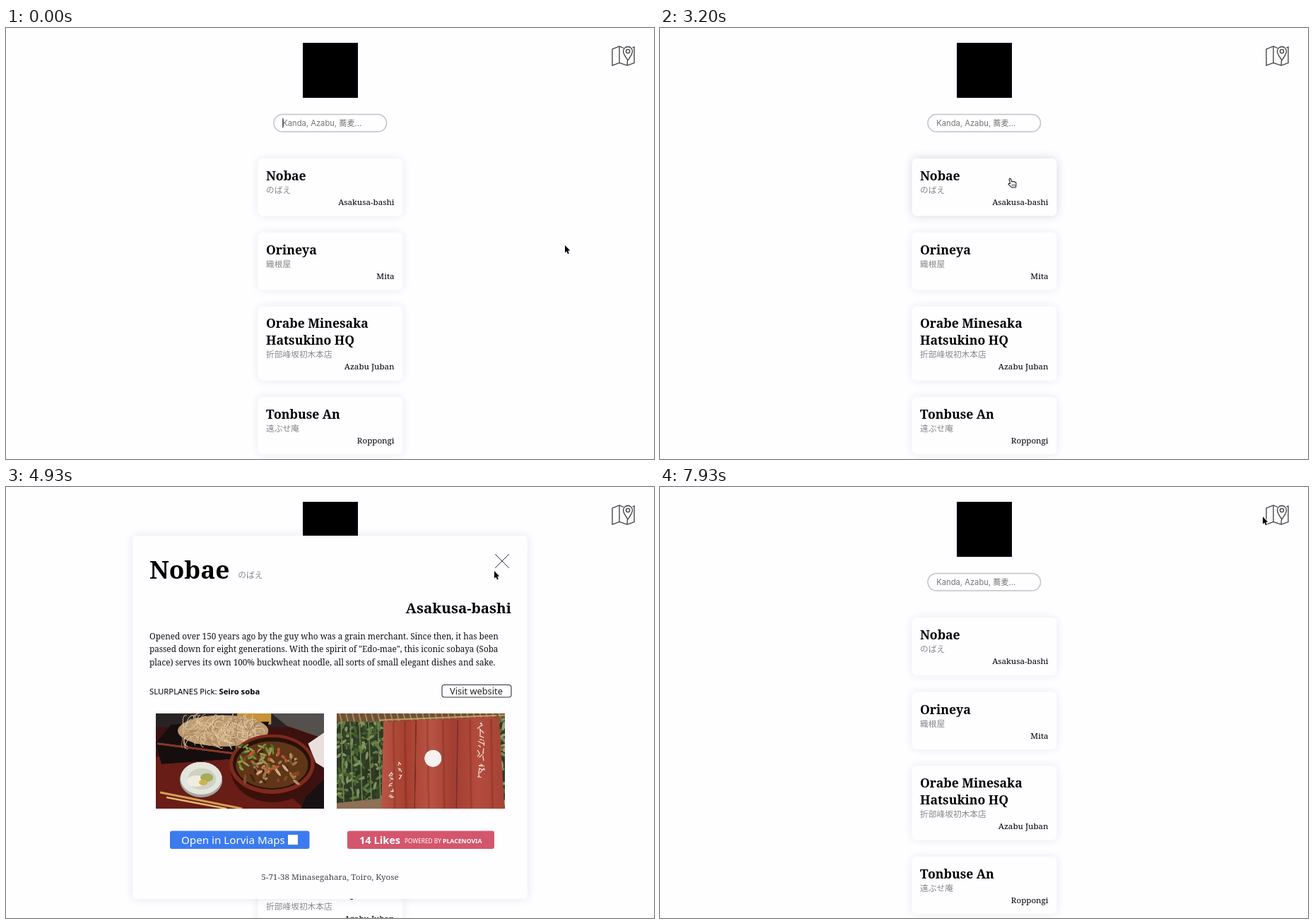
An HTML page with a canvas that plays this animation: 917x611 px, repeating every 8000 ms.

```html
<!DOCTYPE html>
<html lang="ja">
<head>
<meta charset="utf-8">
<title>Soba guide</title>
<style>
html, body { margin: 0; width: 100%; height: 100%; overflow: hidden; background: #fefdff; }
canvas { display: block; width: 917px; height: 611px; }
</style>
</head>
<body>
<canvas id="stage"></canvas>
<script>
const W = 917, H = 611, LOOP = 8000, BG = '#fefdff';
const SERIF = '"Noto Serif", serif';
const SANS = '"Noto Sans", sans-serif';
const CJK = '"Noto Sans CJK JP", "Noto Sans CJK", sans-serif';
const UI = 'Inter, "Noto Sans CJK JP", "Noto Sans CJK", sans-serif';

const stage = document.getElementById('stage');
const dpr = window.devicePixelRatio || 1;
stage.width = W * dpr;
stage.height = H * dpr;
let ctx = stage.getContext('2d');

const clamp = v => Math.max(0, Math.min(1, v));
const ramp = (t, a, b) => clamp((t - a) / (b - a));
const smooth = u => u * u * (3 - 2 * u);
const easeOut = u => 1 - (1 - u) ** 3;

function random(seed) {
  return () => (seed = (seed * 16807) % 2147483647) / 2147483647;
}

// Drawing helpers
function text(str, x, y, font, color = '#000', align = 'left') {
  ctx.font = font;
  ctx.fillStyle = color;
  ctx.textAlign = align;
  ctx.fillText(str, x, y);
  return ctx.measureText(str).width;
}
function box(x, y, w, h, color, r = 0) {
  ctx.fillStyle = color;
  ctx.beginPath();
  ctx.roundRect(x, y, w, h, r);
  ctx.fill();
}
function oval(x, y, rx, ry, color, turn = 0) {
  ctx.fillStyle = color;
  ctx.beginPath();
  ctx.ellipse(x, y, rx, ry, turn, 0, 7);
  ctx.fill();
}
function trace(points) {
  ctx.beginPath();
  for (let i = 0; i < points.length; i += 2) ctx.lineTo(points[i], points[i + 1]);
}
function poly(color, ...points) {
  trace(points);
  ctx.fillStyle = color;
  ctx.fill();
}
function line(color, width, ...points) {
  trace(points);
  ctx.strokeStyle = color;
  ctx.lineWidth = width;
  ctx.stroke();
}
function panel(x, y, w, h, shade, r) {
  ctx.save();
  ctx.shadowColor = `rgba(40,35,42,${shade})`;
  ctx.shadowBlur = 13 * dpr;
  box(x, y, w, h, BG, r);
  ctx.restore();
}
function cross(x, y, r) {
  line('#333', 1, x - r, y - r, x + r, y + r);
  line('#333', 1, x + r, y - r, x - r, y + r);
}

// Pictures, each painted once
function picture(w, h, paint) {
  const canvas = document.createElement('canvas');
  canvas.width = w * 2;
  canvas.height = h * 2;
  const outer = ctx;
  ctx = canvas.getContext('2d');
  ctx.scale(2, 2);
  paint(w, h);
  ctx = outer;
  return canvas;
}
function leaves(seed, count, x, y, w, h, colors, size = 3) {
  const rnd = random(seed);
  for (let i = 0; i < count; i++) {
    oval(x + rnd() * w, y + rnd() * h, size * (0.5 + rnd()), size * 0.4,
      colors[Math.floor(rnd() * colors.length)], rnd() * 3);
  }
}
function bush(seed, x, y, rx, ry, colors) {
  const rnd = random(seed);
  for (let i = 0; i < rx * ry; i++) {
    const a = rnd() * 6.3, r = Math.sqrt(rnd());
    oval(x + Math.cos(a) * r * rx, y + Math.sin(a) * r * ry, 1 + rnd() * 1.6, 0.9,
      colors[Math.floor(rnd() * colors.length)], rnd() * 3);
  }
}
function brush(seed, x, y, count, step, color, size) {
  const rnd = random(seed);
  const near = () => (rnd() - 0.5) * size;
  for (let i = 0; i < count; i++) {
    for (let j = 0; j < 3; j++) {
      const cy = y + i * step;
      line(color, 1.2, x + near(), cy + near(), x + near(), cy + near());
    }
  }
}

const shopFront = picture(182, 104, (w, h) => {
  const greens = ['#3d5230', '#5c7743', '#819b60', '#222d1c', '#a3b582', '#2c3b24'];
  box(0, 0, w, h, '#272424');
  box(0, 0, 18, h, '#e4e6e7');
  box(11, 0, 3, h, '#c3c6c8');
  box(0, 45, 9, 59, '#e6eeea');
  for (let y = 46; y < 104; y += 12) poly('#31906a', 0, y + 5, 9, y, 9, y + 6, 0, y + 11);
  box(18, 0, 20, h, '#2e2d30');
  for (let y = 8; y < 50; y += 8) box(20, y, 16, 1, '#454447');
  poly('#b5b9b6', 152, 0, 182, 0, 182, 24, 160, 26);
  leaves(8, 45, 150, 0, 32, 24, ['#d8dbd8', '#7b8178', '#535853'], 3);
  poly('#8a7361', 68, 4, 122, 2, 124, 18, 67, 19);
  line('#cfc0ad', 1, 67, 19, 124, 18);
  box(70, 6, 6, 7, '#b15645');
  for (let x = 86; x < 118; x += 11) brush(x, x, 11, 1, 1, '#f1e8dc', 11);
  poly('#787673', 46, 21, 137, 21, 154, 30, 36, 30);
  for (let x = 42; x < 152; x += 5) line('#3f3d3b', 1.3, 95 + (x - 95) * 0.8, 21, x, 30);
  line('#b9b6b1', 1.6, 36, 30.5, 154, 30.5);
  box(38, 34, 112, 61, '#1b1817');
  box(54, 41, 56, 20, '#5c392d');
  for (let x = 56; x < 112; x += 6) line('#36211b', 1.5, x, 41, x, 61);
  oval(96, 51, 2, 2, '#e1d3c2');
  box(84, 62, 22, 32, '#0d0a0a');
  box(90, 66, 3, 20, '#57452f');
  box(97, 70, 4, 15, '#35302d');
  poly('#827f7c', 18, 96, 182, 93, 182, 104, 10, 104);
  bush(21, 42, 69, 16, 29, greens);
  bush(5, 71, 70, 10, 25, greens);
  bush(77, 166, 40, 16, 20, greens);
  bush(52, 151, 70, 17, 25, greens);
  bush(61, 172, 78, 11, 22, greens);
  box(114, 66, 18, 29, '#b9b4ae');
  box(115, 67, 9, 14, '#d9d5cd');
  box(125, 68, 6, 18, '#6f7e88');
  brush(12, 119, 74, 3, 8, '#a33b2f', 9);
  poly('#f2f1ec', 139, 67, 153, 65, 156, 80, 142, 83);
  oval(147, 72, 3, 3, '#70645d');
  box(142, 83, 10, 14, '#1e1919');
});

const meal = picture(237, 135, (w, h) => {
  const rnd = random(31);
  box(0, 0, w, h, '#3d1110');
  box(0, 0, w, 20, '#2a2324');
  box(115, 0, 48, 16, '#c7923b');
  poly('#54504e', 163, 0, 237, 0, 237, 36, 185, 18);
  poly('#681d17', 0, 62, 110, 50, 210, 135, 0, 135);
  poly('#160e0e', 0, 42, 22, 16, 160, 12, 152, 35, 120, 64, 8, 72);
  line('#873629', 3, 2, 43, 118, 58, 155, 23);
  oval(95, 25, 64, 22, '#bd9a70');
  for (let i = 0; i < 200; i++) {
    const x = 95 + (rnd() - 0.5) * 106, y = 25 + (rnd() - 0.5) * 31;
    ctx.strokeStyle = ['#dcc19a', '#cbab80', '#a5825a', '#e6cba8'][i % 4];
    ctx.lineWidth = 0.9;
    ctx.beginPath();
    ctx.ellipse(x, y, 5 + rnd() * 9, 3 + rnd() * 4, rnd() * 3, 0, 2 + rnd() * 2);
    ctx.stroke();
  }
  poly('#eadfdd', 237, 28, 215, 43, 226, 70, 237, 77);
  oval(165, 80, 59, 46, '#3b100d');
  oval(164, 72, 60, 42, '#7d2a1c');
  oval(164, 71, 55, 37, '#281209');
  oval(164, 73, 51, 33, '#5f3618');
  leaves(18, 45, 125, 49, 75, 49, ['#a37448', '#7d4c26', '#b58c62', '#432612'], 5);
  leaves(44, 30, 118, 45, 48, 34, ['#6f8d36', '#47692c', '#8a9d4d'], 4);
  leaves(9, 12, 135, 50, 50, 40, ['#b85a31', '#cda981'], 5);
  oval(64, 94, 30, 25, '#a5a59f');
  oval(64, 92, 29, 23, '#e4e5dd');
  oval(65, 93, 20, 15, '#cfd1c3');
  oval(57, 96, 13, 8, '#efede0');
  oval(72, 91, 9, 6, '#a7ac58');
  oval(67, 98, 6, 4, '#ceb44e');
  line('#d69f52', 3, 6, 112, 122, 135);
  line('#e3b96f', 2.5, 15, 119, 100, 135);
  poly('#171113', 212, 118, 237, 94, 237, 135, 205, 135);
});

const curtain = picture(237, 135, (w, h) => {
  box(0, 0, w, h, '#2f3b27');
  leaves(62, 260, 0, 0, 68, 120, ['#45602f', '#5f7a41', '#28351f', '#7f9560', '#344627'], 5);
  for (let x = 6; x < 66; x += 13) line('#74824f', 1.5, x, 12, x + 4, 125);
  poly('#8e7055', 0, 127, 67, 120, 67, 135, 0, 135);
  box(0, 0, w, 12, '#6e5136');
  for (let x = 4; x < w; x += 9) line('#a88656', 2, x, 0, x + 3, 12);
  line('#c39a68', 2, 60, 10, 237, 3);
  leaves(54, 45, 216, 5, 21, 125, ['#7d8d51', '#566b38', '#a59a72'], 5);
  const cloth = ctx.createLinearGradient(65, 0, 232, 0);
  ['#b75545', '#a6402f', '#b95445', '#a23e31', '#b44c3e', '#a84436']
    .forEach((c, i) => cloth.addColorStop(i / 5, c));
  poly(cloth, 66, 12, 229, 5, 237, 135, 63, 135);
  for (const x of [112, 171]) line('#752e24', 1.5, x, 10, x - 2, 135);
  for (const x of [80, 96, 128, 150, 188, 218]) line('rgba(105,30,22,.25)', 3, x, 9, x + 2, 135);
  brush(14, 204, 18, 9, 9, '#eee2d6', 11);
  brush(3, 90, 72, 3, 9, '#eadcd1', 7);
  brush(22, 77, 86, 5, 8, '#eadcd1', 7);
  oval(136, 64, 12, 12, '#f6f2ef');
});

// Shop list
const CARD_X = 356.5, CARD_W = 205, GAP = 23.2, SCROLL_END = 506;
const SCROLL_START = 1118, SCROLL_TIME = 380;
const shops = [
  [['Nobae'], 'のばえ', 'Asakusa-bashi'],
  [['Orineya'], '織根屋', 'Mita'],
  [['Orabe Minesaka', 'Hatsukino HQ'], '折部峰坂初木本店', 'Azabu Juban'],
  [['Tonbuse An'], '遠ぶせ庵', 'Roppongi'],
  [['Kiritsune Soba'], 'きりつねのそば', 'Kanda Awajicho'],
  [['Momizeki'], '椛瀬木', 'Akasaka'],
  [['Sumiriya'], '澄り家', 'Ebisu'],
  [['Kurinobe'], '栗延', 'Jingumae'],
  [['Tsukimori Hanabe'], '槻守花辺', 'Akasaka']
].map(([title, kana, area]) => ({ title, kana, area }));

// A card starts to grow when the scroll first brings its top into view.
let nextTop = 185;
for (const shop of shops) {
  shop.top = nextTop;
  shop.height = 81.5 + 24 * (shop.title.length - 1);
  nextTop += shop.height + GAP;
  const reach = (shop.top - H) / SCROLL_END;
  shop.enter = reach > 0 ? SCROLL_START + SCROLL_TIME * (1 - Math.sqrt(1 - reach)) : -1e6;
}

function scrollAt(t) {
  const down = 1 - (1 - ramp(t, SCROLL_START, SCROLL_START + SCROLL_TIME)) ** 2;
  return SCROLL_END * (down - smooth(ramp(t, 2150, 2800)));
}

function drawDetails(y, hover) {
  const w = text('Slurplanes Pick: ', 368, y + 88, `11.3px ${SANS}`);
  text('Seiro soba', 368 + w, y + 88, `bold 11.3px ${SANS}`);
  ctx.save();
  ctx.beginPath();
  ctx.roundRect(368, y + 97.5, 182, 104, 3);
  ctx.clip();
  if (hover > 0) ctx.filter = `grayscale(${hover}) contrast(${1 + hover * 0.3})`;
  ctx.drawImage(shopFront, 368, y + 97.5, 182, 104);
  ctx.restore();
  ctx.save();
  ctx.globalAlpha *= hover;
  text('Learn More', 459, y + 155, `14px ${SERIF}`, '#fff', 'center');
  ctx.restore();
}

function drawCard(shop, y, t, extra, state) {
  const scale = easeOut(ramp(t, shop.enter, shop.enter + 1500));
  const h = shop.height + extra;
  if (scale <= 0 || y > H + 20 || y + h < 130) return;
  const cx = CARD_X + CARD_W / 2, cy = y + h / 2;
  const alpha = scale ** 1.5;
  ctx.save();
  ctx.translate(cx, cy);
  ctx.scale(scale, scale);
  ctx.translate(-cx, -cy);
  panel(CARD_X, y, CARD_W, h, alpha * (0.09 + 0.1 * state.lift), 7);
  ctx.globalAlpha = alpha;
  const open = extra > 2;
  const color = open ? `rgb(${178 * state.hover},${26 * state.hover},${32 * state.hover})` : '#000';
  let base = y + 31;
  shop.title.forEach((part, i) => {
    const w = text(part, 368, base + 24 * i, `bold 17.6px ${SERIF}`, color);
    if (open) box(368, base + 2, w, 1.4, color);
  });
  base += 24 * (shop.title.length - 1);
  text(shop.kana, 368, base + 18, `11.73px ${CJK}`, '#888');
  text(shop.area, 549.5, base + 35, `11.6px ${SERIF}`, '#000', 'right');
  if (open) {
    ctx.beginPath();
    ctx.rect(CARD_X, y, CARD_W, h - 8);
    ctx.clip();
    drawDetails(y, state.hover);
  }
  ctx.restore();
}

function drawList(t) {
  const scroll = scrollAt(t);
  const extra = 131.5 * (easeOut(ramp(t, 3400, 4000)) - easeOut(ramp(t, 7400, 8050)));
  const idle = { lift: 0, hover: 0 };
  const first = {
    lift: ramp(t, 2980, 3150) - 0.5 * ramp(t, 3550, 3750) - 0.5 * ramp(t, 7450, 7650),
    hover: ramp(t, 3800, 4050) - ramp(t, 4400, 4650)
  };
  shops.forEach((shop, i) => {
    const y = shop.top - scroll;
    if (i) drawCard(shop, y + extra, t, 0, idle);
    else drawCard(shop, y, t, extra, first);
  });
  if (t > 3420 && t < 7420) cross(582.5, 203, 9.3);
}

function drawMapIcon() {
  const ink = '#3c3c3c';
  line(ink, 1.3, 874, 28.5, 868, 26, 858, 30, 858, 53, 868, 49.5, 879, 53, 889, 49.5, 889, 27, 886.5, 28);
  line(ink, 1.3, 868, 26, 868, 49.5);
  line(ink, 1.3, 879.5, 46, 879, 53);
  ctx.beginPath();
  ctx.moveTo(880, 46);
  ctx.bezierCurveTo(877, 41, 873.5, 37, 873.5, 33);
  ctx.arc(880, 33, 6.5, Math.PI, 0);
  ctx.bezierCurveTo(886.5, 37, 883, 41, 880, 46);
  ctx.stroke();
  ctx.beginPath();
  ctx.arc(880, 33, 2.6, 0, 7);
  ctx.stroke();
}

function drawHeader(t) {
  box(0, 0, W, 162, BG);
  box(420, 21, 78, 78, '#000');
  drawMapIcon();
  ctx.strokeStyle = '#c3c1c4';
  ctx.lineWidth = 1.5;
  ctx.beginPath();
  ctx.roundRect(379, 122.5, 159.5, 24.5, 12.2);
  ctx.stroke();
  text('Kanda, Azabu, 蕎麦...', 391.3, 139, `11.2px ${UI}`, '#757575');
  if (t < 3400 && (t + 370) % 1000 < 500) box(391.3, 128, 1.1, 13.5, '#222');
}

// Shop dialog
const story = [
  'Opened over 150 years ago by the guy who was a grain merchant. Since then, it has been',
  'passed down for eight generations. With the spirit of "Edo-mae", this iconic sobaya (Soba',
  'place) serves its own 100% buckwheat noodle, all sorts of small elegant dishes and sake.'
];

function drawDialog(t) {
  const fade = 1 - ramp(t, 5380, 5730);
  const shown = ramp(t, 4290, 4400) * fade;
  if (shown <= 0) return;
  ctx.save();
  ctx.globalAlpha = shown;
  panel(179, 69, 559, 515, 0.11, 6);
  ctx.globalAlpha = ramp(t, 4310, 4680) * fade;

  const w = text('Nobae', 203, 130, `bold 35.2px ${SERIF}`);
  text('のばえ', 203 + w + 12, 129, `11.73px ${CJK}`, '#888');
  cross(702, 105, 9.8);
  text('Asakusa-bashi', 715, 179, `bold 20.5px ${SERIF}`, '#000', 'right');
  story.forEach((row, i) => text(row, 203, 216 + 18.3 * i, `11.73px ${SERIF}`, '#111'));

  const pick = text('SLURPLANES Pick: ', 203, 293.5, `11.3px ${SANS}`);
  text('Seiro soba', 203 + pick, 293.5, `bold 11.3px ${SANS}`);
  ctx.strokeStyle = '#333';
  ctx.lineWidth = 1.1;
  ctx.beginPath();
  ctx.roundRect(617, 280.5, 98, 17.5, 3.5);
  ctx.stroke();
  text('Visit website', 665.5, 294, `12.8px ${SANS}`, '#222', 'center');

  ctx.drawImage(meal, 212, 320.5, 237.5, 135.5);
  ctx.drawImage(curtain, 468, 320.5, 237.5, 135.5);

  box(232, 487.5, 197.5, 25.5, '#3b7bef', 3);
  text('Open in Lorvia Maps', 248, 505.5, `15.2px ${SANS}`, '#fff');
  box(399, 493, 14, 14, '#fff');
  box(483, 487.5, 208, 25.5, '#d4566c', 3);
  text('14 Likes', 500, 505.5, `bold 14.6px ${SANS}`, '#fff');
  text('POWERED BY', 564, 504.5, `300 8.3px ${SANS}`, '#fff');
  text('PLACENOVIA', 618, 504.5, `bold 8.7px ${SANS}`, '#fff');
  text('5-71-38 Minasegahara, Toiro, Kyose', 458.5, 557, `11.6px ${SERIF}`, '#444', 'center');
  ctx.restore();
}

// Mouse pointer: time, x, y
const path = [
  [0, 791, 308], [130, 791, 308], [930, 552, 384], [1300, 537, 386], [2700, 537, 386],
  [3150, 493, 213], [3450, 493, 213], [3950, 523, 311], [4330, 523, 311], [4930, 691, 119],
  [5300, 701, 103], [5850, 701, 99], [6250, 748, 135], [6730, 692, 167], [6900, 712, 146],
  [7250, 582, 202], [7450, 582, 202], [7930, 853, 42], [8000, 853, 42]
];

function pointerAt(t) {
  const i = Math.max(1, path.findIndex(p => p[0] > t));
  const [a, b] = [path[i - 1], path[i]];
  const u = smooth(ramp(t, a[0], b[0]));
  return [a[1] + (b[1] - a[1]) * u, a[2] + (b[2] - a[2]) * u];
}

function drawPointer(t) {
  const within = (a, b) => t > a && t < b;
  const hand = within(3030, 3600) || within(5180, 5400) || within(7180, 7500);
  ctx.save();
  ctx.translate(...pointerAt(t));
  ctx.lineJoin = 'round';
  if (hand) {
    trace([2.6, 7.5, 1, 1.6, 2.2, 0.2, 3.4, 1, 4.6, 5, 6, 4.3, 7.2, 5, 8.4, 4.6, 9.3, 5.7,
      10.4, 5.6, 11, 7, 10.6, 12.6, 5, 13.2, 0, 8.6, 0.4, 7.2]);
    ctx.closePath();
    ctx.fillStyle = '#fff';
    ctx.fill();
    ctx.strokeStyle = '#222';
    ctx.lineWidth = 1.1;
    ctx.stroke();
    for (const x of [5.2, 7, 8.8]) line('#222', 0.8, x, 8.4, x + 0.2, 11);
  } else {
    trace([0, 0, 0, 10.6, 2.4, 8.4, 4, 12.2, 5.8, 11.4, 4.2, 7.8, 7.2, 7.4]);
    ctx.closePath();
    ctx.strokeStyle = '#fff';
    ctx.lineWidth = 1.8;
    ctx.stroke();
    ctx.fillStyle = '#000';
    ctx.fill();
  }
  ctx.restore();
}

function frame(now) {
  const t = now % LOOP;
  ctx.setTransform(dpr, 0, 0, dpr, 0, 0);
  box(0, 0, W, H, BG);
  drawList(t);
  drawHeader(t);
  drawDialog(t);
  drawPointer(t);
}

const start = performance.now();
function tick() {
  frame(performance.now() - start);
  requestAnimationFrame(tick);
}
tick();
</script>
</body>
</html>
```
